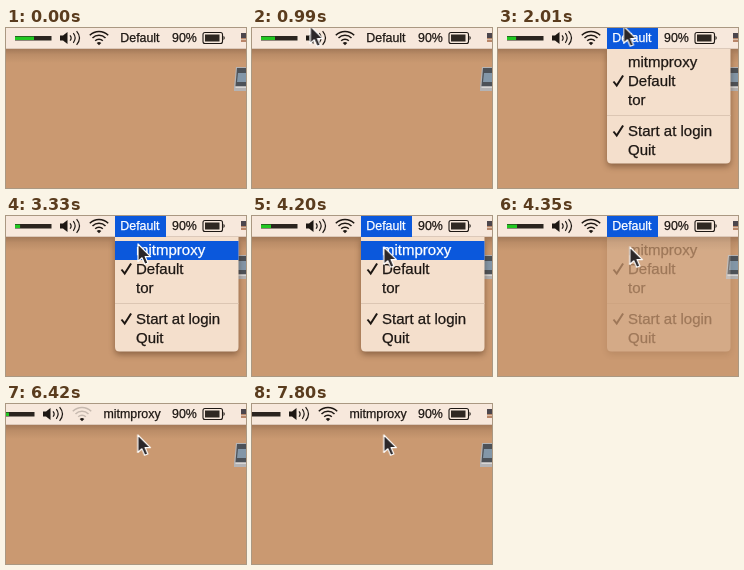
An HTML page that plays this animation: 240x160 px, repeating every 8 s.

```html
<!DOCTYPE html>
<html lang="en">
<head>
<meta charset="utf-8">
<title>Menu bar profile switch</title>
<style>
  html, body { margin: 0; width: 100%; height: 100%; overflow: hidden; background: #ca9971; }
  svg { display: block; width: 100vw; height: 100vh; }
  text { font-family: "Liberation Sans", Arial, Helvetica, sans-serif; fill: #1d1713; stroke: #1d1713; stroke-width: .25px; }
  .bar text { font-size: 12.4px; }
  .menu text { font-size: 15px; }
  .line { fill: none; stroke: #1d1713; }
  .blue { fill: #0b58dc; }
  .bar .inv, .menu .inv { fill: #fff; stroke: #fff; }
  .panel { fill: #f4dfcc; filter: drop-shadow(0 3px 3px rgba(60, 30, 10, .45)); }

  .anim { animation: 8s step-end infinite; }
  .status { animation-name: status; }
  .level { animation-name: level; transform-box: fill-box; transform-origin: left; }
  .old { animation-name: old; }
  .new { animation-name: new; }
  .active { animation-name: active; }
  .menu { animation-name: menu; }
  .pick { animation-name: pick; }
  .dot { animation-name: dot; }
  .arc1 { animation-name: arc1; }
  .arc2 { animation-name: arc2; }
  .arc3 { animation-name: arc3; }
  .cursor { animation-name: cursor; animation-timing-function: ease-in-out; }

  @keyframes status { 0% { transform: none; } 62.25%, 100% { transform: translateX(-17px); } }
  @keyframes level {
    0% { transform: scaleX(.53); }
    9.75% { transform: scaleX(.39); }
    18.75% { transform: scaleX(.3); }
    23.625% { transform: scaleX(.26); }
    29.25% { transform: scaleX(.15); }
    46.125% { transform: scaleX(.28); }
    62.25% { transform: scaleX(.46); }
    74.25% { transform: scaleX(.38); }
    80% { transform: scaleX(.3); }
    89.25%, 100% { transform: scaleX(.15); }
  }
  @keyframes old { 0% { opacity: 1; } 62.25%, 100% { opacity: 0; } }
  @keyframes new { 0% { opacity: 0; } 62.25%, 100% { opacity: 1; } }
  @keyframes active { 0% { opacity: 0; } 23.625% { opacity: 1; } 57%, 100% { opacity: 0; } }
  @keyframes menu {
    0% { opacity: 0; }
    23.625% { opacity: 1; }
    52.875% { opacity: 1; animation-timing-function: linear; }
    54.9%, 100% { opacity: 0; }
  }
  @keyframes pick {
    0% { opacity: 0; }
    41.25% { opacity: 1; }
    51.75% { opacity: 0; }
    52.3% { opacity: 1; }
    52.875%, 100% { opacity: 0; }
  }
  /* While searching, one part of the wifi sign is dark at a time. */
  @keyframes dot { 0%, 75.375%, 97.5%, 100% { opacity: 1; } 66.75%, 84.75% { opacity: .22; } }
  @keyframes arc1 { 0%, 75.375%, 84.75%, 97.5%, 100% { opacity: 1; } 66.75%, 79.875%, 89.25% { opacity: .22; } }
  @keyframes arc2 { 0%, 75.375%, 89.25%, 97.5%, 100% { opacity: 1; } 71.25%, 79.875%, 93.375% { opacity: .22; } }
  @keyframes arc3 { 0%, 71.25%, 93.375%, 100% { opacity: 1; } 66.75%, 79.875% { opacity: .22; } }
  @keyframes cursor {
    0%, .375% { transform: translate(-16px, 110px); }
    9.75%, 11.25% { transform: translate(55px, -2px); }
    18.75%, 39.375% { transform: translate(125.5px, -2px); }
    41.6% { transform: translate(132px, 28px); }
    43.875%, 100% { transform: translate(131.8px, 31px); }
  }
</style>
</head>
<body>
<svg viewBox="0 0 240 160" preserveAspectRatio="none">
  <defs>
    <linearGradient id="shade" x2="0" y2="1">
      <stop stop-color="#7d5a40" stop-opacity=".5"/>
      <stop offset=".4" stop-color="#7d5a40" stop-opacity=".2"/>
      <stop offset="1" stop-color="#7d5a40" stop-opacity="0"/>
    </linearGradient>
    <path id="check" class="line" stroke-width="2" d="M0 6 3.2 10 9.6 0"/>
  </defs>

  <rect width="240" height="160" fill="#ca9971"/>
  <rect y="21" width="240" height="14" fill="url(#shade)"/>

  <g class="desktop-icon">
    <path d="M230 39H240V63H228V59Z" fill="#b4b3b4"/>
    <path d="M231 40H240V58H229.5Z" fill="#4d5258"/>
    <path d="M232 45H240V54H231Z" fill="#8397a8"/>
    <path d="M229.5 59.5H240" stroke="#d8d6d4"/>
  </g>

  <g class="anim menu">
    <path class="panel" d="M109 21H232.5V131Q232.5 135.5 228 135.5H113.5Q109 135.5 109 131Z"/>
    <text x="130" y="39">mitmproxy</text>
    <text x="130" y="58">Default</text>
    <text x="130" y="77">tor</text>
    <path d="M109 87.5H232.5" stroke="#dcc6b3"/>
    <text x="130" y="108">Start at login</text>
    <text x="130" y="127">Quit</text>
    <use href="#check" x="115.5" y="47.5"/>
    <use href="#check" x="115.5" y="97.5"/>
    <g class="anim pick">
      <rect class="blue" x="109" y="25" width="123.5" height="19"/>
      <text class="inv" x="130" y="39">mitmproxy</text>
    </g>
  </g>

  <g class="bar">
    <rect width="240" height="21" fill="#f7e8dc"/>
    <rect y="20" width="240" height="1" fill="#dcc9ba"/>

    <g class="anim status">
      <rect x="9" y="8" width="36.5" height="4.5" fill="#2b241f"/>
      <rect class="anim level" x="9" y="8.6" width="36" height="3.4" fill="#22c722"/>

      <path d="M54 7.5H57L61.5 4V16L57 12.5H54Z" fill="#1d1713"/>
      <path class="line" stroke-width="1.2" d="M64 7.3Q66.3 10 64 12.7M67.3 5.2Q71 10 67.3 14.8M70.6 3.2Q76.4 10 70.6 16.8"/>

      <path class="anim dot" d="M93 17.3 90.7 15Q93 13 95.3 15Z" fill="#1d1713"/>
      <g class="line" stroke-width="1.5">
        <path class="anim arc1" d="M89.2 12.7A5.4 5.4 0 0 1 96.8 12.7"/>
        <path class="anim arc2" d="M86.5 10A9.2 9.2 0 0 1 99.5 10"/>
        <path class="anim arc3" d="M83.8 7.3A13 13 0 0 1 102.2 7.3"/>
      </g>
    </g>

    <text class="anim old" x="114.3" y="14.3">Default</text>
    <text class="anim new" x="97.5" y="14.3">mitmproxy</text>
    <g class="anim active">
      <rect class="blue" x="109" width="51" height="21"/>
      <text class="inv" x="114.3" y="14.3">Default</text>
    </g>

    <text x="166" y="14.3">90%</text>
    <rect class="line" x="197" y="4.5" width="19.5" height="11" rx="2" stroke-width="1.1"/>
    <rect x="199" y="6.5" width="14.5" height="7" fill="#2f2822"/>
    <path d="M217.5 7.8Q220 10 217.5 12.2Z" fill="#1d1713"/>

    <rect x="235" y="5" width="5" height="9" fill="#b98668"/>
    <rect x="235" y="5" width="5" height="5" fill="#4c464c"/>
    <path d="M235 11.5H240" stroke="#d9bda8"/>
  </g>

  <path class="anim cursor" d="M0 0V17.5L4 13.8 6.8 20.3 10 19 7.2 12.6H12.6Z" fill="#2b2729" stroke="#fff" stroke-width="1.2" stroke-linejoin="round"/>
</svg>
</body>
</html>
```
